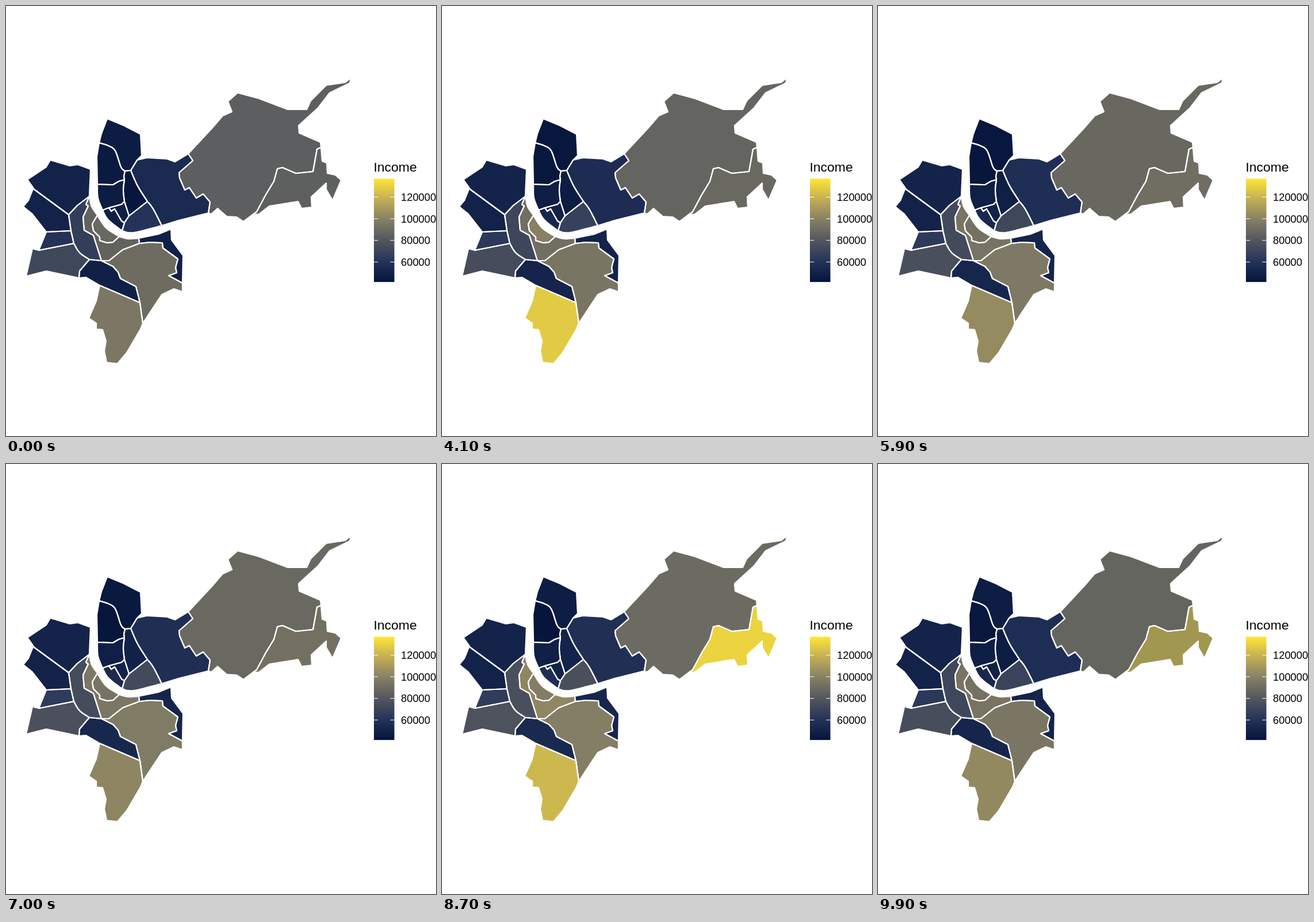
Animation of 748 by 748 pixels, one loop 10 s. Source, as an HTML page with a canvas:

```html
<!DOCTYPE html>
<html lang="en">
<head>
<meta charset="utf-8">
<title>Income by district</title>
<style>
html, body { margin: 0; width: 100%; height: 100%; overflow: hidden; background: #fff; }
canvas { display: block; width: 748px; height: 748px; }
</style>
</head>
<body>
<canvas id="map"></canvas>
<script>
const SIZE = 748, STEP = 100, FRAMES = 100, LAST = 16;
const canvas = document.getElementById('map');
const ctx = canvas.getContext('2d');
const ratio = window.devicePixelRatio || 1;
canvas.width = canvas.height = Math.round(SIZE * ratio);

// Border pieces, each shared by the districts on its two sides; ~ means a smooth curve.
const borders = {
  northOut: '162,238 166,222 176,196 205,208 234,223 236,260 228,268',
  northHirz: '228,268 225,273 217,286',
  northDark: '217,286 207,287',
  northKly: '~207,287 200,280 190,252 178,243 162,238',
  klyOut: '162,238 158,262 159,310',
  klyMat: '159,310 186,311 196,305 206,302',
  klyDark: '206,302 205,296 207,287',
  matOut: '~159,310 160,334 168,355',
  matQuay: '168,355 179,351',
  matClara: '179,351 201,345 206,340',
  matDark: '~206,302 204,320 206,340',
  darkHirz: '~217,286 229,313 246,340',
  darkWet: '246,340 214,365',
  darkClara: '206,340 214,365',
  claraWet: '214,365 206,377',
  claraQuay: '206,377 201,374 189,353 183,357 179,351',
  quayWet: '206,377 202,391',
  quayOut: '~202,391 178,372 168,355',
  wetHirz: '~246,340 256,353 271,382',
  wetOut: '~271,382 228,393 213,394 202,391',
  hirzTop: '228,268 245,264 280,266 294,271 317,257',
  hirzBig: '317,257 325,269 301,290 302,299 311,320 319,316 331,334 343,327 355,341 352,360',
  hirzOut: '352,360 300,373 271,382',
  bigOut: '317,257 358,213 377,191 393,184 386,166 403,151 440,161 490,180 523,180 530,165 557,138 590,133 600,125 598,134 563,151 543,177 509,208 510,221 547,237 548,246',
  bigEast: '548,246 541,249 534,288 504,291 481,281 472,283 466,305 452,328 436,358 429,363',
  bigLow: '429,363 413,375 401,367 384,366 368,352 357,362 352,360',
  eastOut: '548,246 550,270 558,273 559,291 573,294 583,303 568,338 557,319 557,308 531,332 532,350 514,352 508,340 458,348 440,362 429,363',
  westTop: '37,302 70,280 77,268 111,278 125,276 147,284 145,331',
  westMid: '145,331 124,347 109,363',
  westLow: '109,363 49,319 37,302',
  bachOut: '37,302 47,318 39,338 30,349 45,361 70,393',
  bachMid: '109,363 113,391',
  bachStrip: '113,391 70,393',
  stripOut: '70,393 57,425',
  stripMid: '113,391 118,413',
  stripGrey: '118,413 57,425',
  greyOut: '57,425 46,422 35,470 70,461 127,473',
  greyBand: '127,473 128,461 145,441',
  greyMid: '~118,413 128,429 145,441',
  midBand: '145,441 166,443',
  midRing: '145,331 139,345 143,348 134,367 136,390 152,399 166,443',
  ringOut: '~145,331 149,349 159,364',
  ringCore: '159,364 150,379 152,391 163,402 163,408 176,412 186,411 197,401',
  coreOut: '~159,364 174,386 197,401',
  ringLow: '~197,401 212,405 231,404',
  ringBreit: '231,404 232,413',
  ringAlb: '232,413 203,424 179,443 166,443',
  breitOut: '231,404 265,397 287,388 288,407 308,434 307,482',
  breitAlb: '307,482 283,469 297,464 295,455 299,440 273,421 272,412 250,411 232,413',
  albOut: '307,482 307,497 292,492 271,502 257,523 238,552',
  albSouth: '238,552 233,516',
  albBand: '233,516 226,488 199,474 195,463 186,453 166,443',
  bandSouth: '233,516 163,486',
  bandOut: '163,486 139,472 127,473',
  southOut: '238,552 234,562 210,603 194,622 175,620 171,600 174,583 168,563 157,562 157,552 144,543 157,513 163,486'
};

// Outline, income level (0..1) at the start and end, then swings: [centre, half width, amount].
const districts = [
  ['northOut northHirz northDark northKly', .05, .06, [9, 4, -.035]],
  ['klyOut klyMat klyDark northKly', .04, 0],
  ['matOut matQuay matClara matDark klyMat', .05, .08],
  ['northDark darkHirz darkWet darkClara matDark klyDark', .01, .11],
  ['matClara darkClara claraWet claraQuay', .07, .1],
  ['matQuay claraQuay quayWet quayOut', .07, .17],
  ['darkWet wetHirz wetOut quayWet claraWet', .2, .38],
  ['hirzTop hirzBig hirzOut wetHirz darkHirz northHirz', .14, .18],
  ['bigOut bigEast bigLow hirzBig', .44, .51],
  ['eastOut bigEast', .445, .56, [15, 1.5, .44]],
  ['westTop westMid westLow', .09, .1],
  ['westLow bachMid bachStrip bachOut', .09, .09],
  ['bachStrip stripMid stripGrey stripOut', .2, .26],
  ['stripGrey greyMid greyBand greyOut', .315, .385],
  ['westMid midRing midBand greyMid stripMid bachMid', .26, .37],
  ['ringOut ringCore ringLow ringBreit ringAlb midRing', .46, .6, [4.5, 1.5, .06], [14.5, 2, .05]],
  ['coreOut ringCore', .49, .56, [2, 1, .04], [4.3, 1.5, -.08], [7.3, 1.5, .09], [14, 2, .045]],
  ['breitOut breitAlb ringBreit', .08, .12],
  ['breitAlb albOut albSouth albBand ringAlb', .51, .61, [3, 2, -.045]],
  ['midBand albBand bandSouth bandOut greyBand', .08, .14],
  ['bandSouth albSouth southOut', .565, .65, [7.6, 2, .305], [14.3, 1.7, .2]]
];

const palette = [[4, 20, 59], [37, 51, 89], [83, 86, 93], [132, 126, 101], [193, 173, 86], [255, 230, 53]];
const mix = (a, b, p) => a.map((v, i) => v + (b[i] - v) * p);
const css = c => `rgb(${c.map(Math.round)})`;

function shade(level) {
  const x = level * 5, i = Math.min(4, Math.floor(x));
  return mix(palette[i], palette[i + 1], x - i);
}

function levelAt(state, start, end, swings) {
  const trend = start + (end - start) * state / LAST;
  return swings.reduce((sum, [centre, width, amount]) =>
    sum + amount * Math.exp(-(((state - centre) / width) ** 4)), trend);
}

// Catmull-Rom curve through the points.
function smooth(pts) {
  const at = i => pts[Math.max(0, Math.min(pts.length - 1, i))];
  const out = [];
  for (let i = 0; i < pts.length - 1; i++) {
    for (let t = 0; t < 1; t += .125) {
      out.push(at(i).map((b, k) => {
        const a = at(i - 1)[k], c = at(i + 1)[k], d = at(i + 2)[k];
        return b + t / 2 * (c - a + t * (2 * a - 5 * b + 4 * c - d + t * (3 * (b - c) + d - a)));
      }));
    }
  }
  return [...out, at(pts.length - 1)];
}

function points(name) {
  const text = borders[name];
  const pts = text.replace('~', '').split(' ').map(p => p.split(',').map(Number));
  return text[0] === '~' ? smooth(pts) : pts;
}

// Join the pieces end to end, turning each one as needed.
function outline(names) {
  const pieces = names.split(' ').map(points);
  const ring = pieces.shift();
  while (pieces.length) {
    const tip = String(ring[ring.length - 1]);
    const meets = p => String(p[0]) === tip || String(p[p.length - 1]) === tip;
    const [next] = pieces.splice(pieces.findIndex(meets), 1);
    if (String(next[0]) !== tip) next.reverse();
    ring.push(...next);
  }
  return new Path2D('M' + ring.join('L') + 'Z');
}

const shapes = districts.map(([names, start, end, ...swings]) => ({
  path: outline(names),
  color: state => shade(levelAt(state, start, end, swings))
}));

// Each state moves on in three steps, then rests for three; the last one returns to the first.
function pose(time) {
  const frame = Math.floor(time / STEP) % FRAMES;
  if (frame < 3) return [0, 0, 0];
  const from = Math.floor((frame - 3) / 6), step = (frame - 3) % 6;
  return from === LAST ? [from, 0, .5] : [from, from + 1, Math.min(1, (step + 1) / 3)];
}

function drawLegend() {
  const x = 640, top = 300.5, w = 35.6, h = 179.6;
  const ramp = ctx.createLinearGradient(0, top + h, 0, top);
  palette.forEach((c, i) => ramp.addColorStop(i / 5, css(c)));
  ctx.fillStyle = ramp;
  ctx.fillRect(x, top, w, h);
  ctx.fillStyle = '#000';
  ctx.font = '22.92px "Liberation Sans", Arial, sans-serif';
  ctx.fillText('Income', x - .5, 287.5);
  ctx.font = '18.33px "Liberation Sans", Arial, sans-serif';
  ctx.lineWidth = 1;
  for (let i = 0; i < 4; i++) {
    const y = 445.3 - i * 37.6;
    ctx.fillText(String(60000 + i * 20000), 687, y + 6.5);
    ctx.beginPath();
    ctx.moveTo(x, y);
    ctx.lineTo(x + 7.2, y);
    ctx.moveTo(x + w - 7.2, y);
    ctx.lineTo(x + w, y);
    ctx.stroke();
  }
}

function draw(time) {
  const [from, to, p] = pose(time);
  ctx.setTransform(ratio, 0, 0, ratio, 0, 0);
  ctx.fillStyle = '#fff';
  ctx.fillRect(0, 0, SIZE, SIZE);
  for (const { path, color } of shapes) {
    ctx.fillStyle = css(mix(color(from), color(to), p));
    ctx.fill(path);
  }
  ctx.strokeStyle = '#fff';
  ctx.lineWidth = 2.2;
  ctx.lineJoin = 'round';
  for (const { path } of shapes) ctx.stroke(path);
  drawLegend();
}

const start = performance.now();
function tick() {
  draw(performance.now() - start);
  requestAnimationFrame(tick);
}
tick();
</script>
</body>
</html>
```
